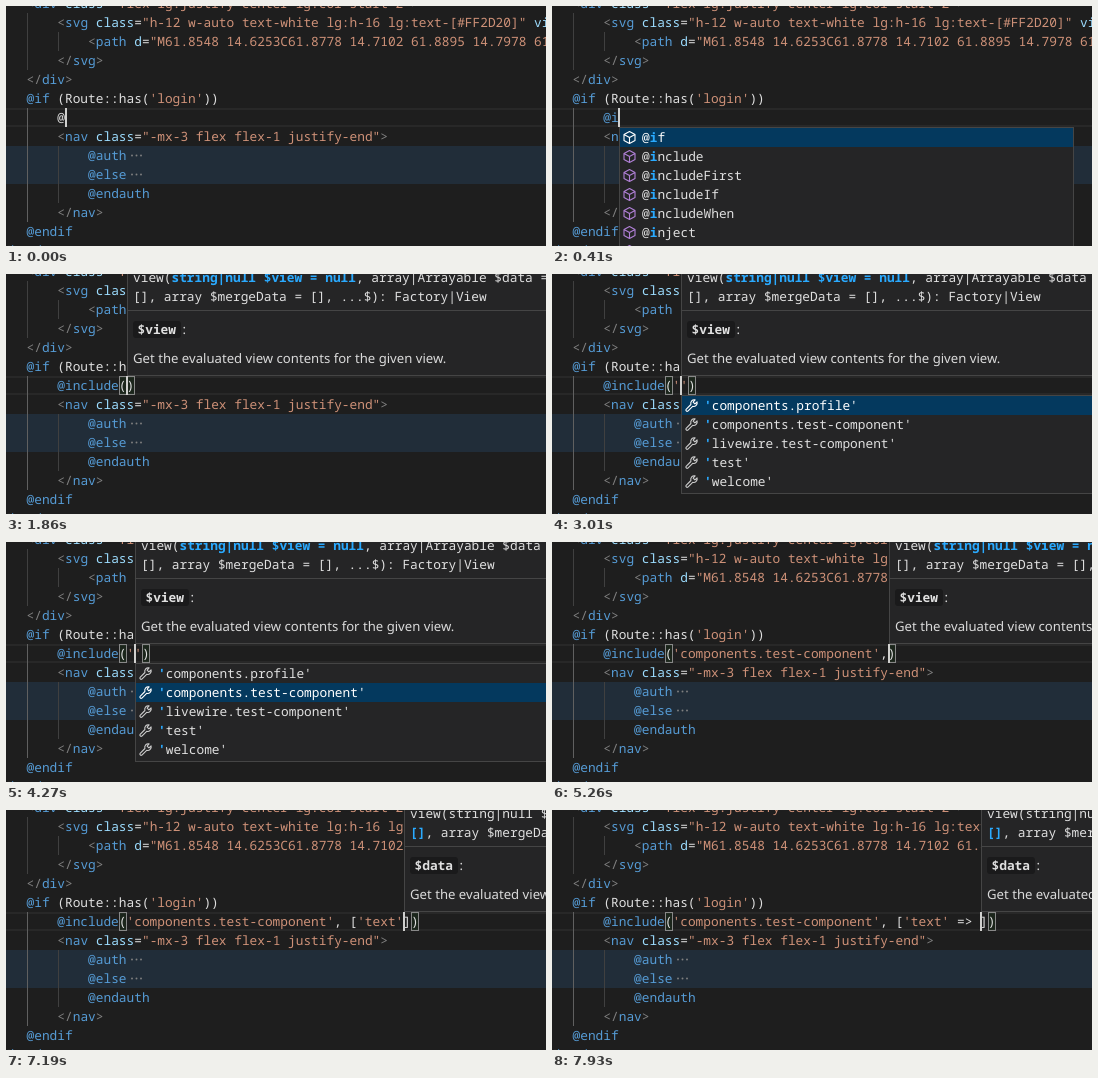
Recreate the animation shown at these times as an HTML page. Size 540x240 px, loop 8000 ms.

```html
<!DOCTYPE html>
<html lang="en">
<head>
<meta charset="utf-8">
<title>Blade autocompletion</title>
<style>
  html, body { margin: 0; width: 100%; height: 100%; overflow: hidden; background: #1e1e1e; }
  svg { display: block; width: 540px; height: 240px; }
  text {
    font: 12.828px "Noto Sans Mono", "Liberation Mono", monospace;
    white-space: pre;
    text-rendering: geometricPrecision;
    fill: #e0e0e0;
  }
  .kw { fill: #569cd6; }
  .pt { fill: #808080; }
  .at { fill: #9cdcfe; }
  .st { fill: #ce9178; }
  .hit { fill: #2aaaff; font-weight: bold; }
  .strong { font-weight: bold; }
  .prose { font: 13.15px "Noto Sans", "Open Sans", sans-serif; fill: #dadada; }
  .guide { fill: #404040; }
  .box { fill: #252526; stroke: #454545; }
  .pair { fill: #006400; fill-opacity: .1; stroke: #888; }
  .icon { fill: none; stroke-linejoin: round; }
</style>
</head>
<body>
<svg viewBox="0 0 540 240">
  <rect width="540" height="240" fill="#1e1e1e"/>
  <rect y="140" width="540" height="38" fill="#212d39"/>
  <path d="M0 103H540M0 120H540" stroke="#282828" stroke-width="2"/>
  <g class="guide">
    <rect x="21" y="7" width="1" height="57"/>
    <rect x="52" y="26" width="1" height="19"/>
    <rect x="21" y="102" width="1" height="114" fill="#606060"/>
    <rect x="52" y="140" width="1" height="57"/>
  </g>
  <g id="code"></g>
  <g fill="#808080" id="folds"></g>
  <g id="pairs">
    <rect class="pair" x="113.5" y="102.5" width="7" height="18"/>
    <rect class="pair" id="close" y="102.5" width="7" height="18"/>
  </g>
  <text id="typed" y="116"></text>
  <g id="hint">
    <rect class="box" x=".5" y="-20.5" width="440" height="122"/>
    <rect x="1" y="36" width="439" height="1" fill="#454545"/>
    <text x="6" y="8">view(<tspan class="p0">string|null $view = null</tspan>, <tspan class="p1">array|Arrayable $data =</tspan></text>
    <text x="6" y="27"><tspan class="p1">[]</tspan>, array $mergeData = [], ...$): Factory|View</text>
    <rect x="6" y="47" width="48" height="17" rx="3" fill="#1a1a1b"/>
    <text x="10.5" y="60" class="strong" id="param"></text>
    <text x="55.5" y="60" class="prose">:</text>
    <text x="6" y="88.5" class="prose">Get the evaluated view contents for the given view.</text>
  </g>
  <g id="menu"></g>
  <rect id="caret" y="102" width="2" height="19" fill="#d0d0ce"/>
</svg>
<script>
const LOOP = 8000, ADV = 7.697, LEFT = 51.31, ROW = 19, MENU_W = 454;
const $ = id => document.getElementById(id);
const colX = col => LEFT + col * ADV;
const esc = s => s.replace(/&/g, '&amp;').replace(/</g, '&lt;');
const span = (cls, s) => `<tspan class="${cls}">${esc(s)}</tspan>`;
const php = s => esc(s).replace(/'[^']*'?/g, str => span('st', str));

// Static code lines: [row, column, markup]
const open = (tag, attr, value) =>
  span('pt', '<') + span('kw', tag) + ' ' + span('at', attr) + '=' + span('st', `"${value}"`);
const shut = tag => span('pt', '</') + span('kw', tag) + span('pt', '>');
const gt = span('pt', '>');
const lines = [
  [0, -4, open('div', 'class', 'flex lg:justify-center lg:col-start-2') + gt],
  [1, 0, open('svg', 'class', 'h-12 w-auto text-white lg:h-16 lg:text-[#FF2D20]') + ' ' + span('at', 'viewBox') + '='],
  [2, 4, open('path', 'd', 'M61.8548 14.6253C61.8778 14.7102 61.8895 14.7978 61.8897 14.8858')],
  [3, 0, shut('svg')],
  [4, -4, shut('div')],
  [5, -4, span('kw', '@if') + php(" (Route::has('login'))")],
  [7, 0, open('nav', 'class', '-mx-3 flex flex-1 justify-end') + gt],
  [8, 4, span('kw', '@auth')],
  [9, 4, span('kw', '@else')],
  [10, 4, span('kw', '@endauth')],
  [11, 0, shut('nav')],
  [12, -4, span('kw', '@endif')],
  [13, -8, shut('header')]
];
$('code').innerHTML = lines.map(([row, col, body]) =>
  `<text x="${colX(col)}" y="${2 + row * ROW}">${body}</text>`).join('');
$('folds').innerHTML = [149.5, 168.5].map(y =>
  [126, 130.5, 135].map(x => `<circle cx="${x}" cy="${y}" r=".95"/>`).join('')).join('');

// Suggestion lists; `from` is the column where the matched word starts
const includes = ['@include', '@includeFirst', '@includeIf', '@includeWhen', '@inject'];
const menus = {
  all: { from: 1, items: ['@append', '@auth', '@break', '@case', '@checked', '@class', '@continue'] },
  i: { from: 1, items: ['@if', ...includes, '@isset'] },
  inc: { from: 1, items: includes },
  views: { from: 9, prop: true, items: ["'components.profile'", "'components.test-component'",
    "'livewire.test-component'", "'test'", "'welcome'"] },
  keys: { from: 39, prop: true, items: ["'text'"] }
};
const CUBE = 'M0-6 5.5-3V3L0 6-5.5 3V-3ZM-5.5-3 0 0 5.5-3M0 0V6';
const WRENCH = 'M3.6-5.6A3.6 3.6 0 0 0-.6-1L-5.4 3.8A1.3 1.3 0 0 0-3.6 5.6L1.2.8A3.6 3.6 0 0 0 5.6-3.6L3.4-1.6 1.6-3.4Z';

// Text typed up to the caret, and the changes along the loop
const SOURCE = "@include('components.test-component', ['text' => ";
const steps = [
  [0, { col: 1, tail: '', hint: 0, param: 0, menu: '', at: 0, sel: 0 }],
  [30, { menu: 'all', at: 1 }],
  [360, { col: 2 }],
  [410, { menu: 'i', at: 2 }],
  [470, { col: 3 }],
  [520, { menu: 'inc', at: 3 }],
  [630, { col: 4 }],
  [730, { at: 4 }],
  [1120, { col: 8, menu: '' }],
  [1630, { col: 9, tail: ')' }],
  [1750, { hint: 9 }],
  [1980, { col: 10, tail: "')", hint: 10 }],
  [3010, { menu: 'views', at: 10 }],
  [4270, { sel: 1 }],
  [4650, { col: 36, tail: ')', hint: 36, menu: '', sel: 0 }],
  [5190, { col: 37 }],
  [5260, { hint: 37 }],
  [5360, { col: 38 }],
  [5430, { hint: 38, param: 1 }],
  [5530, { col: 39, tail: '])' }],
  [5630, { hint: 39 }],
  [5800, { col: 40, tail: "'])" }],
  [5900, { hint: 40, menu: 'keys', at: 40 }],
  [6740, { col: 45, tail: '])', hint: 45, menu: '' }],
  [7430, { col: 46 }],
  [7560, { hint: 46 }],
  [7790, { col: 48, hint: 48 }],
  [7930, { col: 49, hint: 49 }]
];
const states = [];
for (const [time, change] of steps) {
  const moved = 'col' in change ? { moved: time } : {};
  states.push({ ...states[states.length - 1], ...change, ...moved, time });
}

const popupX = col => Math.floor(colX(col)) + 1;

function label(text, query) {
  let k = 0;
  return [...text].map(c => k < query.length && c === query[k] ? (k++, span('hit', c)) : esc(c)).join('');
}

function menuMarkup({ menu, at, sel }) {
  if (!menu) return '';
  const { from, prop, items } = menus[menu], query = SOURCE.slice(from, at);
  const rows = items.map((item, i) => {
    const on = i === sel, y = 122 + i * ROW;
    const ink = on ? '#fff' : prop ? '#ccc' : '#b180d7';
    return (on ? `<rect x="1" y="${y}" width="${MENU_W - 1}" height="${ROW}" fill="#04395e"/>` : '') +
      `<path class="icon" d="${prop ? WRENCH : CUBE}" transform="translate(10.5 ${y + 9.5})" stroke="${ink}" stroke-width="1.1"/>` +
      `<text x="23" y="${y + 14}"${on ? ' style="fill:#fff"' : ''}>${label(item, query)}</text>`;
  });
  return `<g transform="translate(${popupX(at)})">` +
    `<rect class="box" x=".5" y="121.5" width="${MENU_W}" height="${items.length * ROW + 3}"/>${rows.join('')}</g>`;
}

function show(s) {
  const word = s.col > 1 ? SOURCE.slice(0, Math.min(8, s.col)) : '';
  $('typed').innerHTML = span('kw', word) + php(SOURCE.slice(word.length, s.col) + s.tail);
  $('pairs').style.display = s.tail ? '' : 'none';
  $('close').setAttribute('x', Math.round(colX(s.col + s.tail.length - 1)) + .5);
  $('hint').style.display = s.hint ? '' : 'none';
  $('hint').setAttribute('transform', `translate(${popupX(s.hint)})`);
  $('param').textContent = s.param ? '$data' : '$view';
  for (const p of [0, 1])
    document.querySelectorAll('.p' + p).forEach(el => el.classList.toggle('hit', p === s.param));
  $('menu').innerHTML = menuMarkup(s);
  $('caret').setAttribute('x', Math.floor(colX(s.col)));
}

let shown = null;
function frame() {
  const t = performance.now() % LOOP;
  const s = states.filter(x => x.time <= t).pop();
  if (s !== shown) show(shown = s);
  const lit = (t - s.moved + 15) % 1015 < 505;
  $('caret').style.visibility = lit ? 'visible' : 'hidden';
  requestAnimationFrame(frame);
}
$('typed').setAttribute('x', LEFT);
frame();
</script>
</body>
</html>
```
